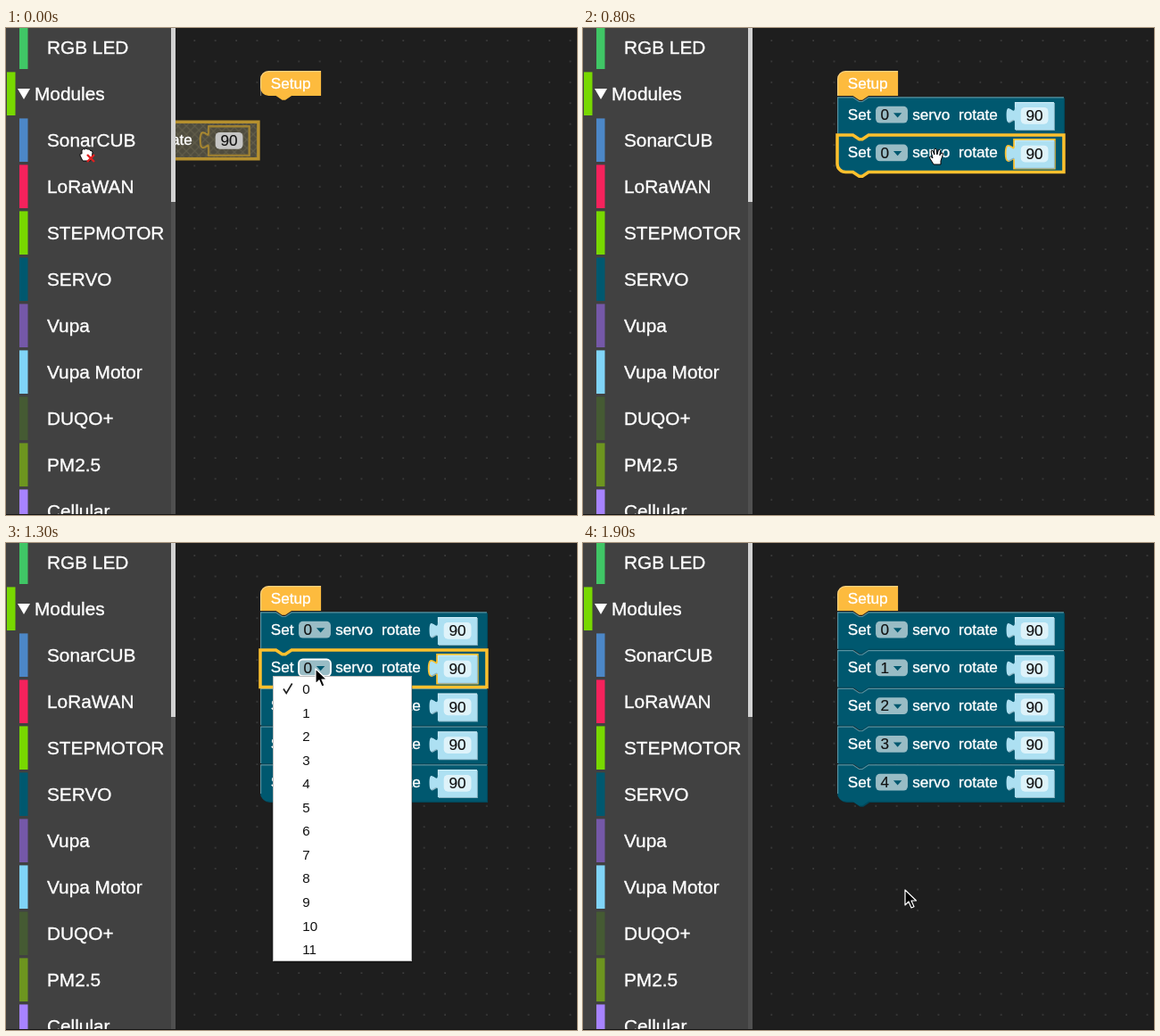
An HTML page for the animation above (2 s loop, 640 by 546 pixels).

```html
<!DOCTYPE html>
<html lang="en">
<head>
<meta charset="utf-8">
<title>Block editor</title>
<style>
html, body { margin: 0; width: 100%; height: 100%; overflow: hidden; background: #1e1e1e; }
svg { display: block; width: 100vw; height: 100vh; font-family: "Liberation Sans", Arial, sans-serif; }
.side { font-size: 20.8px; fill: #fff; stroke: #fff; stroke-width: .35; }
.menu { font-size: 15.2px; fill: #111; }
.menu .off { fill: #c2c2c2; }
.label { font-size: 14.67px; fill: #fff; stroke: #fff; stroke-width: .3; }
.digit { font-size: 14.67px; fill: #111; stroke: #111; stroke-width: .15; }
.field { fill: #fff; fill-opacity: .6; }
.hot { stroke: #fff; stroke-width: 1.6; }
.edit { fill-opacity: 1; }
.setup { fill: #fdbb3e; }
.servo { fill: #00586f; fill-rule: evenodd; }
.value { fill: #ade0f2; }
.shade { fill: #00475a; fill-rule: evenodd; }
.valueShade { fill: #8ab3c2; }
.light { fill: none; stroke: #fff; stroke-opacity: .35; stroke-width: 1; }
.selected { stroke: #fcc02e; stroke-width: 3; }
.ghost .servo, .ghost .value { fill: url(#hatch); }
.ghost .selected { stroke: #b5902f; }
.ghost .value { stroke: #8b7435; stroke-width: 1; }
.ghost .shade, .ghost .valueShade, .ghost .light { display: none; }
.ghost .field { fill: #ccc; fill-opacity: .95; }
.hand { fill: #fff; stroke: #000; stroke-width: 1; stroke-linejoin: round; }
.arrow { fill: #000; stroke: #fff; stroke-width: 1.2; stroke-linejoin: round; }
.beam { fill: none; stroke: #222; stroke-width: 1.2; }
.cross { fill: none; stroke: #e02020; stroke-width: 2.4; }
</style>
</head>
<body>
<svg viewBox="0 0 640 546" preserveAspectRatio="none">
  <defs>
    <pattern id="grid" width="23.4" height="23.4" patternUnits="userSpaceOnUse" x="-11.1" y="2.3">
      <rect x="11.2" y="11.2" width="1.2" height="1.2" fill="#5c5c5c"/>
    </pattern>
    <pattern id="hatch" width="8" height="8" patternUnits="userSpaceOnUse">
      <rect width="8" height="8" fill="#4f4c3e"/>
      <path d="M0 0L8 8M8 0L0 8" stroke="#615d4a" stroke-width="1"/>
    </pattern>
  </defs>
  <rect width="640" height="546" fill="#1e1e1e"/>
  <rect width="640" height="546" fill="url(#grid)"/>
  <g id="workspace"></g>
  <g id="toolbox"></g>
  <g id="overlay"></g>
  <rect y="545" width="640" height="1" fill="#161616"/>
</svg>
<script>
const SCALE = 1.17, LEFT = 285, TOP = 48, ROW = 42.75, FIRST = TOP + 25 * SCALE;
const SETUP_H = 24, BLOCK_H = 35.5, NOTCH = 'l6,4 3,0 6,-4', TAIL = 'H30l-6,4 -3,0 -6,-4';
const rowY = i => FIRST + ROW * i;
const at = (x, y, body, scale = 1) => `<g transform="translate(${x} ${y}) scale(${scale})">${body}</g>`;
const path = (cls, d, extra = '') => `<path class="${cls}" d="${d}" ${extra}/>`;
const text = (cls, x, y, s) => `<text class="${cls}" x="${x}" y="${y}">${s}</text>`;
const box = (cls, x, y, w, h) => `<rect class="${cls}" x="${x}" y="${y}" width="${w}" height="${h}" rx="4"/>`;

function toolbox() {
  const items = [
    ['RGB LED', '#40c666'], ['Modules', '#78d800'], ['SonarCUB', '#4c87c7'],
    ['LoRaWAN', '#f5225c'], ['STEPMOTOR', '#78d800'], ['SERVO', '#00586f'],
    ['Vupa', '#7558a8'], ['Vupa Motor', '#80d4f7'], ['DUQO+', '#455a33'],
    ['PM2.5', '#6d951f'], ['Cellular', '#a783ff']
  ];
  const rows = items.map(([name, color], i) => {
    const x = i === 1 ? 1 : 15, y = i * 52 - 2.6;
    return `<rect x="${x}" y="${y}" width="9.5" height="48.6" fill="${color}"/>` +
      text('side', i === 1 ? 32 : 46, i * 52 + 29, name);
  }).join('');
  return '<rect width="190" height="546" fill="#414141"/>' +
    '<rect x="185" width="5" height="546" fill="#505050"/>' +
    '<rect x="185" width="5" height="195" fill="#d2d2d2"/>' +
    rows + '<path d="M13 68H27L20 80Z" fill="#fff"/>';
}

function setupBlock(attached) {
  const corner = attached ? 'H0' : 'H8a8,8 0 0 1 -8,-8';
  const d = `M0,8a8,8 0 0 1 8,-8H58.2V${SETUP_H}${TAIL}${corner}z`;
  return at(LEFT, TOP, path('setup', d) + path('light', 'M.5,24V8a7.5,7.5 0 0 1 7.5,-7.5H58') +
    text('label', 10, 17, 'Setup'), SCALE);
}

function servoBlock(x, y, { port, value = '90', selected, last, hot, editing }) {
  const textW = 8.16 * value.length, valueW = textW + 21.3, w = 179.4 + valueW;
  const plug = `H${valueW}V26.5H0V20c0,-10 -8,8 -8,-7.5s8,2.5 8,-7.5z`;
  const hole = `M170,5h${valueW}v26.5h${-valueW}v-6.5c0,-10 -8,8 -8,-7.5s8,2.5 8,-7.5z`;
  const corner = last ? 'H8a8,8 0 0 1 -8,-8' : 'H0';
  const d = `M0,0H15${NOTCH}H${w}V${BLOCK_H}${TAIL}${corner}z${hole}`;
  const edge = selected ? '' : path('light', `M.5,${last ? 28 : BLOCK_H}V.5H15${NOTCH}H${w}`);
  const valuePart = path('valueShade', 'M0,0' + plug, 'transform="translate(.8 .8)"') +
    path('value', 'M0,0' + plug) + path('light', `M.5,5V.5H${valueW}`) +
    box('field' + (editing ? ' edit' : ''), 5.8, 5, textW + 10, 16) +
    text('digit', 10.8, 17.9, value);
  return at(x, y,
    (selected ? '' : path('shade', d, 'transform="translate(1 1)"')) +
    path('servo' + (selected ? ' selected' : ''), d) + edge +
    text('label', 10, 21.7, 'Set') +
    box('field' + (hot ? ' hot' : ''), 36.8, 9, 30.7, 16) +
    text('digit', 41.4, 21.8, port) +
    path('', 'M53.8,15.4h8l-4,4.4z', 'fill="#00586f"') +
    text('label', 72, 21.7, 'servo') + text('label', 116.2, 21.7, 'rotate') +
    at(170, 5, valuePart), SCALE);
}

const panel = (x, y, w, h, r) =>
  `<rect x="${x + 1}" y="${y + 2}" width="${w}" height="${h}" rx="${r}" fill="#000" opacity=".3"/>` +
  `<rect x="${x}" y="${y}" width="${w}" height="${h}" rx="${r}" fill="#fff" stroke="#bbb"/>`;

function contextMenu(row) {
  const y = rowY(row) + 24.5;
  const items = ['Duplicate', 'External Inputs', 'Collapse Block', 'Disable Block', 'Delete 2 Blocks', 'Help'];
  return '<g class="menu">' + panel(406, y, 250, 168, 4) +
    `<rect x="406.5" y="${y + 6}" width="240" height="26.5" fill="#d6e8f7"/>` +
    items.map((s, i) => text(i === 5 ? 'off' : '', 438, y + 24.5 + i * 26.6, s)).join('') + '</g>';
}

function portMenu(row) {
  const y = rowY(row) + 29.5;
  let items = '';
  for (let i = 0; i < 12; i++) items += text('', 332.3, y + 19.5 + i * 26.55, i);
  return '<g class="menu">' + panel(299.5, y, 155, 319, 0) + items +
    path('', `M311,${y + 14}l3.2,5 6.5,-11`, 'fill="none" stroke="#222" stroke-width="1.7"') + '</g>';
}

const fist = path('hand', 'M4 16L1 10Q0 7 3 8V4Q4 2 6 3Q8 1 9.5 3Q12 2 12.5 4.5Q15 4 15 6.5L14.5 11L12.5 16Z');
const cursors = {
  arrow: path('arrow', 'M0 0V17l4-4 3 7 3-1.3-3-6.7h5.5z'),
  fist,
  trash: fist + path('cross', 'M9 9l8 8m0-8l-8 8'),
  hand: path('hand', 'M5 19L1 12.5Q-.5 10 1.5 10L4 12 2.2 5Q2 3 4 3.4L5.8 8V2Q7 0 8.3 2L8.8 8 10.5 2.5Q12 1.5 12.6 3.3L11.8 8.8 14 6Q16 5.8 15.3 8L13 15V19Z'),
  beam: path('beam', 'M-3.5 0Q0 0 0 3V17Q0 20 -3.5 20M3.5 0Q0 0 0 3M0 17Q0 20 3.5 20M-2 13H2')
};

// One entry per 100 ms: the port of each block, selected row, cursor, extras.
const steps = [
  ['', -1, 'trash', 82, 133, { drag: true }],
  ['0', 0, 'fist', 338, 105],
  ['0', 0, 'hand', 430, 96],
  ['0', 0, 'beam', 503, 90, { value: '90', editing: true }],
  ['0', 0, 'beam', 499, 90, { value: '0', editing: true }],
  ['0', 0, 'beam', 499, 90, { value: '90', editing: true }],
  ['0', 0, 'hand', 404, 93],
  ['0', 0, 'arrow', 429, 111.5, { context: true }],
  ['00', 1, 'hand', 388, 134],
  ['000', 2, 'hand', 392, 177],
  ['000', 2, 'arrow', 429, 197, { context: true }],
  ['0000', 3, 'hand', 392, 219],
  ['00000', 4, 'hand', 392, 261],
  ['00000', 1, 'arrow', 347, 141, { ports: true }],
  ['01000', 2, 'arrow', 349, 183, { ports: true }],
  ['01200', 3, 'arrow', 351, 224, { hot: true }],
  ['01200', 3, 'arrow', 351, 226, { ports: true }],
  ['01230', 4, 'arrow', 350, 268, { ports: true }],
  ['01234', -1, 'arrow', 358, 372],
  ['01234', -1, 'arrow', 361, 389]
];

const byId = id => document.getElementById(id);
const workspace = byId('workspace'), overlay = byId('overlay');
byId('toolbox').innerHTML = toolbox();

function show([ports, selectedRow, cursor, x, y, extra = {}]) {
  const blocks = [...ports].map((port, row) => {
    const selected = row === selectedRow;
    return servoBlock(LEFT, rowY(row), {
      port, selected, last: row === ports.length - 1,
      value: selected ? extra.value : undefined,
      editing: selected && extra.editing,
      hot: selected && (extra.hot || extra.ports)
    });
  });
  // The selected block goes on top so that its outline stays whole.
  if (selectedRow >= 0) blocks.push(...blocks.splice(selectedRow, 1));
  const dragged = extra.drag
    ? `<g class="ghost">${servoBlock(29, 105.25, { port: '0', selected: true, last: true })}</g>` : '';
  workspace.innerHTML = setupBlock(ports.length > 0) + blocks.join('') + dragged;
  overlay.innerHTML = (extra.context ? contextMenu(selectedRow) : '') +
    (extra.ports ? portMenu(selectedRow) : '') + at(x, y, cursors[cursor]);
}

const start = performance.now();
let current = -1;
function tick(now) {
  const step = Math.floor(Math.max(0, now - start) / 100) % steps.length;
  if (step !== current) show(steps[current = step]);
  requestAnimationFrame(tick);
}
tick(start);
</script>
</body>
</html>
```
